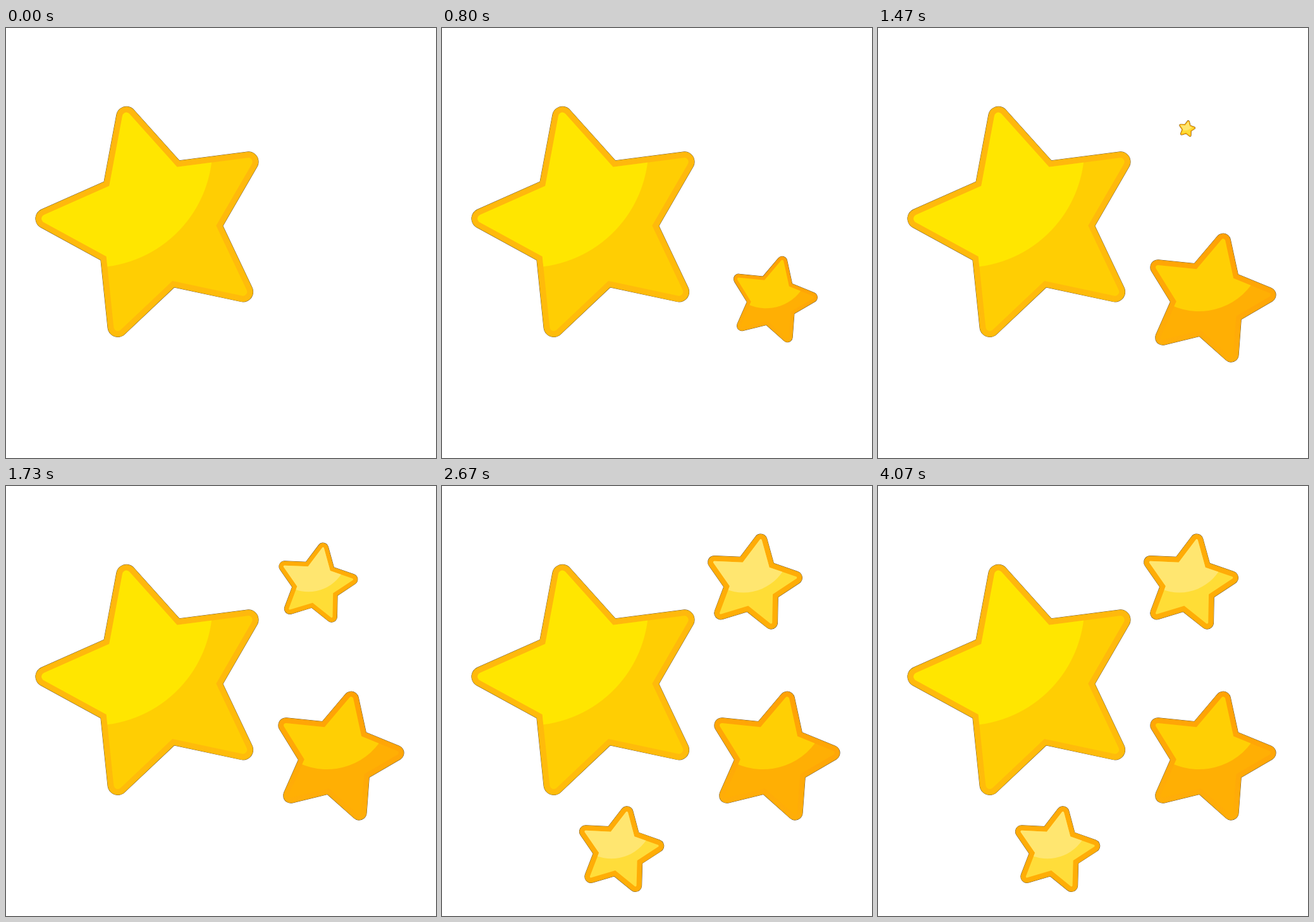
Write an HTML page with a canvas that moves like this. It is 680x680 px and loops after 4110 ms.

```html
<!DOCTYPE html>
<html lang="en">
<head>
<meta charset="utf-8">
<title>Stars</title>
<style>
  html, body { margin: 0; width: 100%; height: 100%; overflow: hidden; background: #fff; }
  canvas { display: block; }
</style>
</head>
<body>
<canvas id="stage" width="680" height="680"></canvas>
<script>
const ctx = document.getElementById('stage').getContext('2d');
const LOOP = 4110;
const GROW = 12; // steps from nothing to full size
const RAD = Math.PI / 180;

// size: centre to tip centre; rim, core: tip radii of the border and the face
// ax, ay: the point the star grows from; start: step at which it begins
// edge: border colours from top to bottom
const stars = [
  { x: 237.6, y: 308.6, size: 175, turn: -15.65, rim: 15.8, core: 6.5,
    ax: 237.6, ay: 308.6, start: -GROW, edge: ['#ffb70d', '#ffbc0a'], base: '#ffce03', light: '#ffe600' },
  { x: 522.9, y: 428.7, size: 94.6, turn: 14, rim: 11.8, core: 3.5,
    ax: 522.3, ay: 433.8, start: 16, edge: ['#ffa205', '#ffae08'], base: '#ffaf04', light: '#ffcf04' },
  { x: 491.1, y: 153.7, size: 68.9, turn: 10.8, rim: 10.1, core: 1.8,
    ax: 488, ay: 160.6, start: 42, edge: ['#ffab08', '#ffae06'], base: '#ffdd36', light: '#ffe670' },
  { x: 280.4, y: 576.3, size: 61, turn: 11.3, rim: 9.8, core: 1.7,
    ax: 278, ay: 588, start: 68, edge: ['#ffab08', '#ffae06'], base: '#ffdd3a', light: '#ffe670' }
];

// Star outline pushed out by r: round tips, sharp notches
function outline(size, r) {
  const notch = size / 2 + r / 0.885;
  const spread = 63.73 * RAD;
  ctx.beginPath();
  for (let i = 0; i < 5; i++) {
    const a = (i * 72 - 90) * RAD;
    const b = a + 36 * RAD;
    ctx.arc(size * Math.cos(a), size * Math.sin(a), r, a - spread, a + spread);
    ctx.lineTo(notch * Math.cos(b), notch * Math.sin(b));
  }
  ctx.closePath();
}

function shade(size, [top, bottom]) {
  const g = ctx.createLinearGradient(0, -size, 0, size);
  g.addColorStop(0, top);
  g.addColorStop(1, bottom);
  return g;
}

function drawStar(s, scale) {
  ctx.save();
  ctx.translate(s.ax, s.ay);
  ctx.scale(scale, scale);
  ctx.translate(s.x - s.ax, s.y - s.ay);
  ctx.rotate(s.turn * RAD);

  outline(s.size, s.rim);
  ctx.lineWidth = 1 / scale;
  ctx.strokeStyle = 'rgba(84, 54, 0, 0.85)';
  ctx.stroke();
  ctx.fillStyle = shade(s.size, s.edge);
  ctx.fill();

  outline(s.size, s.core);
  ctx.fillStyle = s.base;
  ctx.fill();
  ctx.clip();
  ctx.beginPath();
  ctx.arc(-0.372 * s.size, -0.816 * s.size, 1.087 * s.size, 0, 2 * Math.PI);
  ctx.fillStyle = s.light;
  ctx.fill();
  ctx.restore();
}

// Steps run at 30 per second, each starting on a whole 10 ms
function stepAt(t) {
  let n = Math.floor(t * 0.03) + 1;
  while (n > 0 && Math.round(n / 0.3) * 10 > t) n--;
  return n;
}

function draw(t) {
  const step = stepAt(t);
  ctx.fillStyle = '#fff';
  ctx.fillRect(0, 0, 680, 680);
  for (const s of stars) {
    const scale = Math.min(1, (step - s.start) / GROW);
    if (scale > 0) drawStar(s, scale);
  }
}

const begin = performance.now();
function tick() {
  draw((performance.now() - begin) % LOOP);
  requestAnimationFrame(tick);
}
tick();
</script>
</body>
</html>
```
